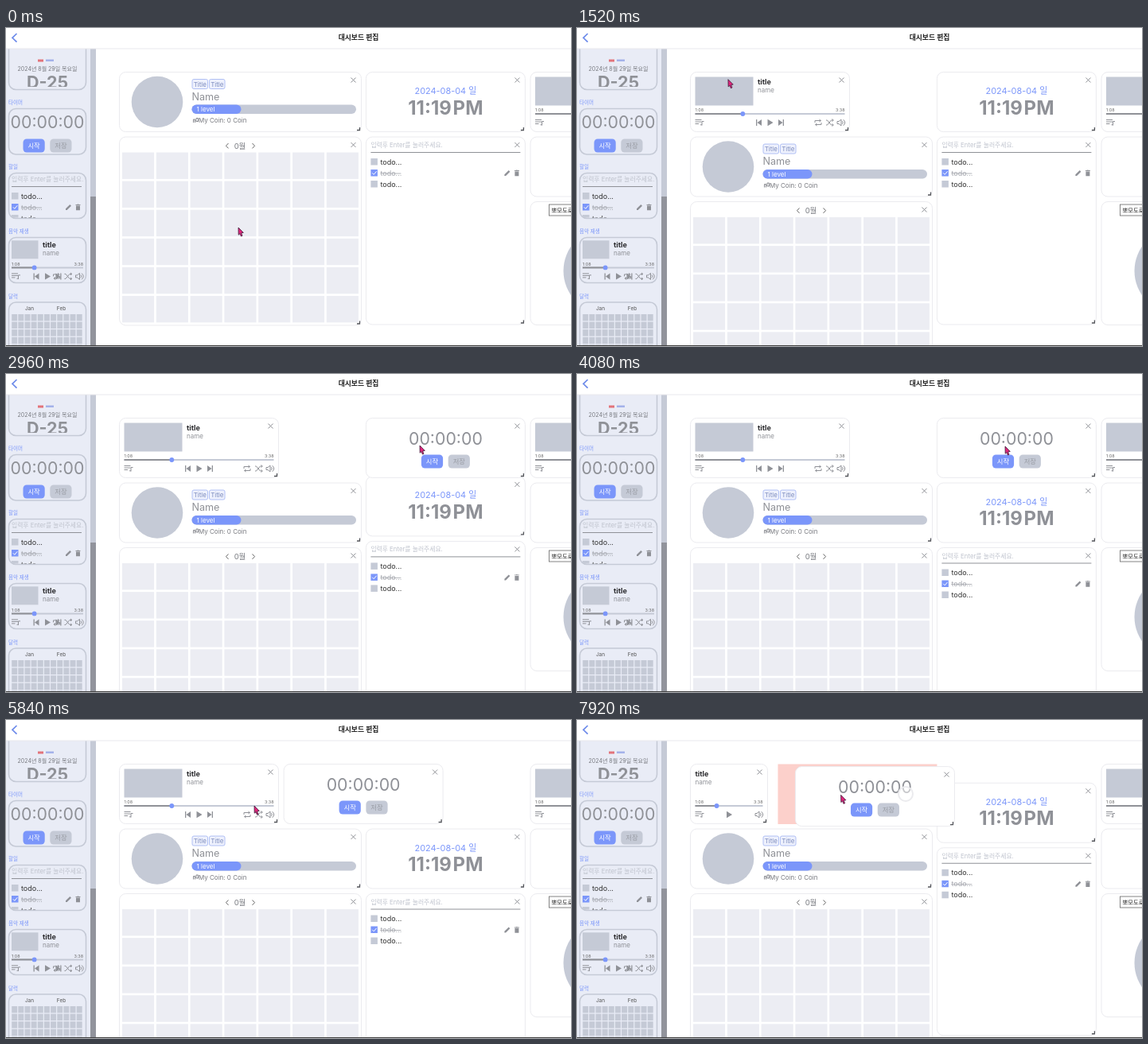
An HTML page for the animation above (8000 ms loop, 710 px wide and 400 px high).

```html
<!DOCTYPE html>
<html lang="ko">
<head>
<meta charset="utf-8">
<title>대시보드 편집</title>
<style>
html, body { margin: 0; width: 100%; height: 100%; overflow: hidden; background: #fff; }
svg { display: block; width: 710px; height: 400px; font-family: Inter, "Noto Sans CJK KR", "Noto Sans CJK", sans-serif; }
text { white-space: pre; }
</style>
</head>
<body>
<svg id="stage" viewBox="0 0 710 400"></svg>
<script>
const LOOP = 8000;
const BLUE = '#7b96fa', GRAY = '#c5cad6', INK = '#8f9197', SIDE = '#e9ecf6', DARK = '#2b2b2e';

// Dashboard grid
const PITCH = 103.3, STEP = 81.5;
const col = n => 142.5 + PITCH * n;
const row = n => 55.5 + STEP * n;

// Drawing helpers
const T = (x, y, size, text, fill, more = '') =>
  `<text x="${x}" y="${y}" font-size="${size}" fill="${fill}" ${more}>${text}</text>`;
const R = (x, y, w, h, fill, more = '') =>
  `<rect x="${x}" y="${y}" width="${w}" height="${h}" fill="${fill}" ${more}/>`;
const C = (x, y, r, fill) => `<circle cx="${x}" cy="${y}" r="${r}" fill="${fill}"/>`;
const P = (d, color, width = 1) => `<path d="${d}" fill="none" stroke="${color}" stroke-width="${width}"/>`;
const G = (x, y, body) => `<g transform="translate(${x} ${y})">${body}</g>`;
const MID = 'text-anchor="middle"', END = 'text-anchor="end"', BOLD = 'font-weight="700"', MEDIUM = 'font-weight="500"';
const cells = (cols, rows, x, y, dx, dy, gap, fill) => {
  let out = '';
  for (let i = 0; i < cols * rows; i++)
    out += R(x + i % cols * dx, y + Math.floor(i / cols) * dy, dx - gap, dy - gap, fill);
  return out;
};

const LINES = {
  list: 'M-5.5-3.5h8M-5.5-1h8M-5.5 1.5h4.5M3 3.5v-5h2.5M1 2.8h2',
  repeat: 'M-4 0v-2.5h7M1.5-4l2 1.5-2 1.5M4 0v2.5h-7M-1.5 4l-2-1.5 2-1.5',
  shuffle: 'M-4.5-3h1.5l5 6h2.5M-4.5 3h1.5l5-6h2.5M3-4.5l1.8 1.5-1.8 1.5M3 1.5l1.8 1.5-1.8 1.5',
  volume: 'M-4.5-1.5h2l3-2.5v8l-3-2.5h-2zM2-1.8q1.6 1.8 0 3.6M3.2-3.8q4 3.8 0 7.6'
};
const SOLIDS = {
  play: 'M-3-4.2L4 0-3 4.2z',
  prev: 'M-3.5-4h1.3v8h-1.3zM3.5-4v8L-2 0z',
  next: 'M3.5-4h-1.3v8h1.3zM-3.5-4v8L2 0z',
  pencil: 'M-3.5 3.5v-1.7L1.8-3.5l1.7 1.7-5.3 5.3z',
  trash: 'M-2.5-2h5v5.8h-5zM-3-3.5h2l.5-.5h1l.5.5h2v.9h-6z'
};
const icon = (name, x, y) => G(x, y, SOLIDS[name]
  ? `<path d="${SOLIDS[name]}" fill="${INK}"/>` : P(LINES[name], INK));

const card = (w, h, body) =>
  R(0, 0, w, h, '#fff', 'rx="8" stroke="#ebebef"') + body +
  P(`M${w - 13} 7l6 6m0-6l-6 6`, '#85878d', .9) + P(`M${w - 2} ${h - 5.5}v3.5h-3.5`, '#55575c', 1.3);
const sideCard = (h, body) => R(0, 0, 97, h, SIDE, `rx="9" stroke="${GRAY}" stroke-width="1.6"`) + body;

// Widgets
const button = (x, y, text, fill, ink) => R(x, y, 27.2, 17, fill, 'rx="4.5"') +
  T(x + 13.6, y + 11.6, 8.3, text, ink, MID + ' ' + MEDIUM);
const timer = (c, base, top) => T(c, base, 21.3, '00:00:00', INK, MID) +
  button(c - 30.5, top, '시작', BLUE, '#fff') + button(c + 3.3, top, '저장', GRAY, '#989ba3');

function music(w, { pad = 6, up = 0, low = 0, cover = [73, 36], selected = false } = {}) {
  const right = w - pad, mid = w / 2, bar = 52.5 - low, y = bar + 11, knob = pad + (w - 2 * pad) * .318;
  const x = cover ? pad + cover[0] + 5.5 : pad;
  const mark = (mx, my, mw, mh) => selected ? R(mx, my, mw, mh, '#3566b6') : '';
  const ink = color => selected ? '#e8ecf8' : color;
  let out = cover ? R(pad, 6 - up, ...cover, GRAY) : '';
  out += mark(x, 6, 19, 11) + mark(x, 17, 22, 9.5) + mark(pad, bar - 8, 11, 7) + mark(right - 12, bar - 8, 12, 7);
  out += T(x, 15 - up, 9, 'title', ink(DARK), BOLD) + T(x, 25 - up, 8, 'name', ink(INK));
  out += T(pad, bar - 2.7, 5.4, '1:08', ink('#666')) + T(right, bar - 2.7, 5.4, '3:38', ink('#666'), END);
  out += P(`M${pad} ${bar}H${right}`, GRAY, 2) + P(`M${pad} ${bar}H${knob}`, INK, 2) + C(knob, bar, 2.9, BLUE);
  out += icon('list', pad + 5.5, y) + icon('play', mid, y) + icon('volume', right - 5, y);
  if (cover) out += icon('prev', mid - 14, y) + icon('next', mid + 14, y) +
    icon('repeat', right - 33.5, y) + icon('shuffle', right - 19, y);
  return out;
}

function todo(w) {
  let out = T(6, 13, 7.8, '입력후 Enter를 눌러주세요.', '#bfc3cd') + P(`M6 19.5H${w - 6}`, INK);
  for (let i = 0; i < 3; i++) {
    const y = 27 + i * 14, done = i === 1;
    out += R(6, y, 8.5, 8.5, done ? BLUE : GRAY) + T(18, y + 7.7, 9, 'todo...', done ? '#a9abb2' : '#333');
    if (done) out += P(`M7.8 ${y + 4.3}l2 2 3.4-4`, '#fff') + P(`M18 ${y + 5}h26`, '#a0a2a9', .8) +
      icon('pencil', w - 22.5, y + 4.5) + icon('trash', w - 10.5, y + 4.5);
  }
  return out;
}

const tag = x => R(x, 9, 19.5, 12, '#eef1fd', 'rx="2" stroke="#a9b9f3" stroke-width=".9"') +
  T(x + 9.8, 18, 8, 'Title', '#7c8bbd', MID);
const level = (w, fill) => R(91, 41, w, 11.5, fill, 'rx="5.75"');
const profile = C(47.5, 37.5, 32.3, GRAY) + tag(91.5) + tag(113) + T(91, 35.3, 12.6, 'Name', INK) +
  level(206.5, GRAY) + level(62, BLUE) + T(97, 49.7, 8, '1 level', '#fff') +
  P('M93 63.5v-4h2v4m1.5-5.5h2.5v4h-2.5z', '#85878d') + T(99.5, 63.6, 8, 'My Coin: 0 Coin', '#77797f');
const calendar = P('M137 8l-3 3.2 3 3.2M167 8l3 3.2-3 3.2', '#666') + T(151.5, 14.5, 9.5, '0월', '#77797f', MID) +
  cells(7, 6, 3.5, 19.5, 42.8, 36.1, 2.7, '#ecedf3');
const clock = T(100, 27.5, 10.9, '2024-08-04 일', BLUE, MID) +
  T(100, 53, 24, '11:19 PM', INK, `${MID} ${BOLD} word-spacing="-4"`);

const sideMusic = sideCard(57, music(97, { pad: 3.5, up: 2.2, low: 14.6, cover: [33.5, 23] }));
const sideTimer = sideCard(57.5, timer(48.5, 24.7, 38));
const sideMonths = T(26, 10, 6.5, 'Jan', '#555', MID) + T(66, 10, 6.5, 'Feb', '#555', MID) +
  cells(11, 5, 3.7, 15, 8.15, 9.6, 1.2, GRAY);
const clip = (id, body) => `<g clip-path="url(#${id})">${body}</g>`;
const sideItem = (y, name, body) => T(3, y - 5.3, 6.5, name, BLUE) + G(3.5, y, body);
const sidebar = R(0, 26, 106, 374, SIDE) + R(106, 26, 7, 374, GRAY) + R(106, 212, 7, 188, '#92949c') +
  clip('body', G(3.5, 10, sideCard(67.5, ''))) +
  R(40, 39.5, 7, 3, '#e2747b') + R(50, 39.5, 10, 2.5, '#a4b2ea') +
  T(52, 54, 7, '2024년 8월 29일 목요일', '#77797f', MID) +
  clip('dday', T(52, 76.3, 21.5, 'D-25', INK, MID + ' ' + BOLD)) +
  sideItem(101.5, '타이머', sideTimer) +
  sideItem(182.5, '할일', sideCard(57, clip('todo', G(-2.5, -2.5, todo(100))))) +
  sideItem(263.5, '음악 재생', sideMusic) + sideItem(345, '달력', sideCard(80, sideMonths));
const header = R(0, 0, 710, 26, '#fff') + P('M0 26H710', '#e9e9ed') + P('M13.5 7l-5.5 5.3 5.5 5.3', '#6d8bea', 1.7) +
  T(443, 15, 8.8, '대시보드 편집', '#222', MID + ' ' + BOLD);
const rightColumn = [music(200), '', C(96, 87, 54.5, GRAY) +
  R(23.5, 3.5, 60, 14, '#fff', 'stroke="#777" stroke-width=".9"') + T(26.5, 13.2, 7.3, '뽀모도로 타이머', '#222')]
  .map((body, i) => G(col(5), row(i), card(200, i < 2 ? 75 : 155, body))).join('');

const ARROW = 'M0 0L6.3 6.4 3.6 6.9 5 10.3 3.4 11 2 7.6 .2 9.2z';
const CURSORS = {
  arrow: `<path d="${ARROW}" fill="#e0267c" stroke="#3a1a38" stroke-width=".8"/>`,
  copy: `<path d="${ARROW}" fill="#fff" stroke="#222" stroke-width=".9"/>` +
    R(3, 6.5, 5.5, 5.5, '#fff', 'stroke="#333" stroke-width=".9"') + P('M5.75 7.8v3M4.25 9.3h3', '#333', .9),
  deny: C(4, 4, 4, '#5a1633') + C(4, 4, 2.4, '#e9a9b6') + P('M1.8 1.8l4.4 4.4', '#5a1633', 1.5)
};

const stage = document.getElementById('stage');
const part = (id, body = '') => `<g id="${id}">${body}</g>`;
const region = (id, y, w, h) => `<clipPath id="${id}">${R(0, y, w, h, '#fff')}</clipPath>`;
stage.innerHTML = region('body', 26, 106, 374) + region('dday', 26, 106, 48) + region('todo', 0, 97, 56) +
  R(0, 0, 710, 400, '#fff') + rightColumn +
  part('profile', card(304, 75, profile)) + part('calendar', card(304, 237, calendar)) +
  part('clock', card(200, 75, clock)) + part('todos', card(200, 236, todo(200))) +
  part('music') + R(0, 0, 200, 75.5, 'rgb(241,41,19)', 'id="slot" fill-opacity=".22"') +
  part('timer', card(200, 75, part('timerBody', timer(100, 33.2, 46)))) +
  sidebar + header + R(0, 399, 710, 1, '#444') +
  `<g opacity=".62">${part('ghostMusic', sideMusic)}${part('ghostTimer', sideTimer)}</g>` +
  '<circle id="ring" r="9" fill="#fff" fill-opacity=".5" stroke="#ebebee" stroke-width="2"/>' +
  Object.keys(CURSORS).map(k => part(k, CURSORS[k])).join('');
const el = id => document.getElementById(id);

// Motion
const clamp = u => Math.max(0, Math.min(1, u));
const glide = (t, from, time) => {
  const u = clamp((t - from) / time);
  return u * u * (3 - 2 * u);
};
const within = (t, a, b) => t >= a && t < b;
const place = (id, x, y) => el(id).setAttribute('transform', `translate(${x} ${y})`);
const show = (id, on) => el(id).setAttribute('display', on ? 'inline' : 'none');

// Pointer strokes: start, duration, goal x, goal y, bow
const STROKES = [
  [80, 680, 65, 285, -8], [900, 184, 190, 64], [1500, 800, 42, 131, 95],
  [2460, 100, 397, 37], [2570, 230, 520, 90], [3260, 340, 410, 150], [3600, 440, 538, 91, -80],
  [4200, 440, 429, 94], [4740, 220, 400, 146], [5040, 800, 312, 108], [5960, 200, 341, 127],
  [6380, 420, 238, 128], [6820, 380, 555, 148], [7280, 260, 413, 91], [7660, 350, 316, 95]
];
function pointer(t) {
  let x = 292, y = 251;
  for (const [from, time, goalX, goalY, bow = 0] of STROKES) {
    if (t <= from) break;
    const u = glide(t, from, time), dx = goalX - x, dy = goalY - y;
    const lift = bow * Math.sin(Math.PI * u) / Math.hypot(dx, dy);
    x += dx * u + dy * lift;
    y += dy * u - dx * lift;
  }
  return [x, y];
}

const PRESSES = [900, 2380, 4150, 6380, 7640];
const ADD_MUSIC = [960, 1240], ADD_TIMER = [2470, 2960];
const MOVES = [{ from: 4200, to: 4740, start: 3, flip: 4400 }, { from: 7660, to: LOOP, start: 2, flip: 7828 }];
const RESIZE = [6400, 6920];
const rise = (t, from, time) => 380 + (row(0) - 380) * glide(t, from, time);

function timerAt(t) {
  let x = col(t < MOVES[0].to ? 3 : 2), y = rise(t, 2700, 260);
  for (const m of MOVES) {
    if (!within(t, m.from, m.to + 140)) continue;
    const [x0, y0] = pointer(m.from), [x1, y1] = pointer(Math.min(t, m.to) - 20);
    const home = glide(t, m.to, 140), dragX = col(m.start) + x1 - x0, dragY = row(0) + y1 - y0;
    x = dragX + (x - dragX) * home;
    y = dragY + (y - dragY) * home;
  }
  return [x, y];
}

function slotAt(t) {
  const move = MOVES.find(m => within(t, m.from, m.to));
  if (move) return [col(move.start - glide(t, move.flip, 110)), row(0), 200];
  if (within(t, 1000, ADD_MUSIC[1])) return [col(0), rise(t, 1040, 160), 200];
  if (within(t, 2700, ADD_TIMER[1])) return [col(3), rise(t, 2720, 160), 200];
  if (within(t, ...RESIZE)) return [col(0), row(0), 200 - PITCH * glide(t, 6540, 110)];
}

let musicKey = '';
function drawMusic(t) {
  show('music', t >= 1000);
  place('music', col(0), rise(t, 1000, 160));
  const w = 200 + Math.min(0, t < RESIZE[0] ? 0 : pointer(Math.min(t, RESIZE[1]) - 113)[0] - 341);
  const h = within(t, ...RESIZE) ? 77 : 75;
  const selected = within(t, RESIZE[0], MOVES[1].from), filled = t >= ADD_MUSIC[1];
  const key = [w.toFixed(1), h, selected, filled].join();
  if (key === musicKey) return;
  musicKey = key;
  const options = { low: 75 - h, selected };
  if (w < 165) options.cover = null;
  el('music').innerHTML = card(w, h, filled ? music(w, options) : '');
}

function draw(t) {
  const pushed = glide(t, 2800, 200) - glide(t, 7840, 126);
  place('profile', col(0), row(glide(t, 1120, 160)));
  place('calendar', col(0), row(1 + glide(t, 995, 160)));
  place('clock', col(3), row(pushed));
  place('todos', col(3), row(1 + pushed));
  drawMusic(t);
  show('timer', t >= 2700);
  show('timerBody', t >= ADD_TIMER[1]);
  place('timer', ...timerAt(t));

  const slot = slotAt(t);
  show('slot', slot);
  if (slot) {
    place('slot', slot[0], slot[1]);
    el('slot').setAttribute('width', slot[2]);
  }

  const [x, y] = pointer(t);
  const adding = within(t, ...ADD_MUSIC), addingTimer = within(t, ...ADD_TIMER);
  show('ghostMusic', adding);
  place('ghostMusic', x - 77, y - 13);
  show('ghostTimer', addingTimer);
  place('ghostTimer', x - 44.5, y - 42.5);
  const mode = addingTimer && t < 2640 ? 'deny' : adding || addingTimer ? 'copy' : 'arrow';
  for (const name in CURSORS) show(name, name === mode);
  place(mode, x, y);

  const press = PRESSES.find(p => within(t, p, p + 450));
  show('ring', press);
  if (press) {
    const [px, py] = pointer(press);
    place('ring', px, py + 2);
    el('ring').setAttribute('opacity', clamp((press + 450 - t) / 150));
  }
}

const start = performance.now();
function tick() {
  draw((performance.now() - start) % LOOP);
  requestAnimationFrame(tick);
}
tick();
</script>
</body>
</html>
```
